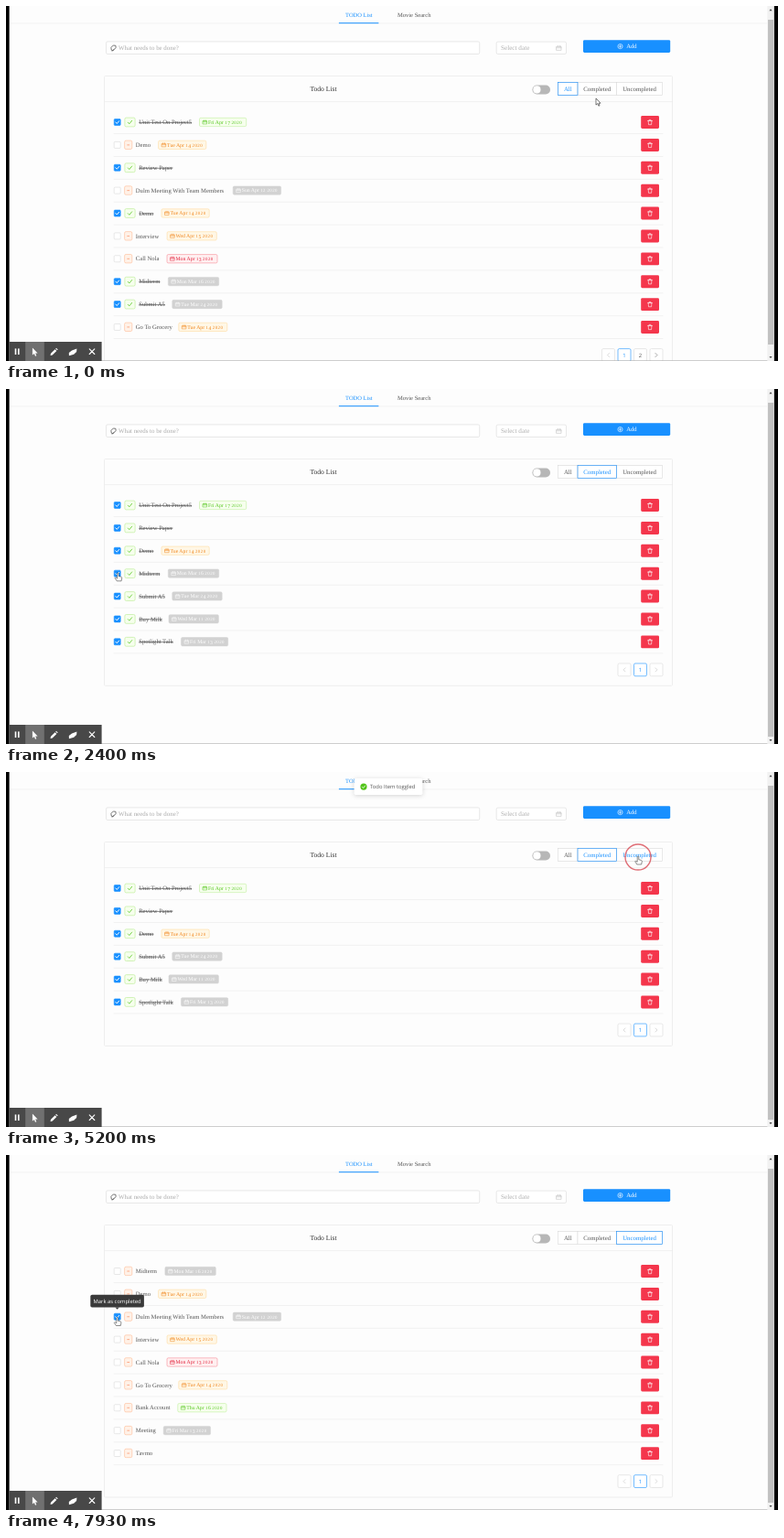
Recreate the animation shown at these times as an HTML page. Size 844 px wide and 388 px high, loop 8000 ms.

```html
<!DOCTYPE html>
<html lang="en">
<head>
<meta charset="utf-8">
<title>Todo list</title>
<style>
html, body { margin: 0; width: 100%; height: 100%; overflow: hidden; background: #fdfdfd; }
svg { display: block; width: 100vw; height: 100vh; }
text { font-family: "Liberation Serif", "Times New Roman", serif; font-size: 6.65px; fill: #555; text-rendering: geometricPrecision; }
.sans { font-family: "Open Sans", "Noto Sans", sans-serif; font-size: 5.87px; }
.mid { text-anchor: middle; }
.done { text-decoration: line-through; }
.date { font-size: 5.75px; }
.low { baseline-shift: -0.17em; }
.small { font-size: 0.84em; letter-spacing: 0.1em; }
.line { fill: none; stroke-linecap: round; stroke-linejoin: round; }
#toast rect { filter: drop-shadow(0 1.5px 2.5px rgba(0,0,0,.16)); }
</style>
</head>
<body>
<svg id="stage" viewBox="0 0 844 388" preserveAspectRatio="none"></svg>
<script>
const LOOP = 8000, BLUE = '#1890ff', RULE = '#ececec', ROW0 = 127, PITCH = 24.88;

// Time marks, ms
const T = { filterDone: 900, uncheck: 3120, refresh: 4400, filterOpen: 5790, check: 7830 };

const tones = {
  green: ['#f6ffed', '#b7eb8f', '#52c41a'],
  orange: ['#fff7e6', '#ffd591', '#f0861c'],
  red: ['#fff0f1', '#f47885', '#e2203a'],
  grey: ['#d2d2d2', '#d2d2d2', '#fff']
};

// name: [label, tag offset, tag width, date, tone]
const todos = {
  unit: ['Unit Test On Project5', 66.3, 51.2, 'Fri Apr 17 2020', 'green'],
  demo: ['Demo', 24.8, 52.2, 'Tue Apr 14 2020', 'orange'],
  paper: ['Review Paper'],
  team: ['Dulm Meeting With Team Members', 106.4, 52.4, 'Sun Apr 12 2020', 'grey'],
  talk: ['Interview', 34.3, 54.2, 'Wed Apr 15 2020', 'orange'],
  call: ['Call Nola', 34.2, 55, 'Mon Apr 13 2020', 'red'],
  midterm: ['Midterm', 32.1, 55.4, 'Mon Mar 16 2020', 'grey'],
  submit: ['Submit A5', 36.6, 54.4, 'Tue Mar 24 2020', 'grey'],
  grocery: ['Go To Grocery', 47, 53, 'Tue Apr 14 2020', 'orange'],
  milk: ['Buy Milk', 32.8, 54.4, 'Wed Mar 11 2020', 'grey'],
  spot: ['Spotlight Talk', 46.3, 51.2, 'Fri Mar 13 2020', 'grey'],
  bank: ['Bank Account', 46, 53.2, 'Thu Apr 16 2020', 'green'],
  meeting: ['Meeting', 30.4, 51.4, 'Fri Mar 13 2020', 'grey'],
  course: ['Tavmo']
};

// A leading + marks a finished todo
const views = {
  all: '+unit demo +paper team +demo talk call +midterm +submit grocery',
  done: '+unit +paper +demo +midterm +submit +milk +spot',
  doneLess: '+unit +paper +demo +submit +milk +spot',
  open: 'midterm demo team talk call grocery bank meeting course'
};

const rowY = i => ROW0 + PITCH * i;

const rect = (x, y, w, h, fill, stroke = 'none', r = 0, sw = 0.6) =>
  `<rect x="${x}" y="${y}" width="${w}" height="${h}" rx="${r}" fill="${fill}" stroke="${stroke}" stroke-width="${sw}"/>`;
const path = (d, stroke, sw = 0.7, extra = '') =>
  `<path class="line" d="${d}" stroke="${stroke}" stroke-width="${sw}" ${extra}/>`;
const text = (x, y, s, { cls = '', fill = '', size = 0, id = '' } = {}) =>
  `<text x="${x}" y="${y}" class="${cls}" ${id && `id="${id}"`} style="${fill && `fill:${fill};`}${size ? `font-size:${size}px` : ''}">${s}</text>`;
const group = (id, body) => `<g id="${id}">${body}</g>`;

// Old-style figures: 0-2 at x-height, 3 4 5 7 9 below the baseline
const figures = s => s.replace(/[0-2]+|[34579]+/g, d =>
  `<tspan class="${d < '3' ? 'small' : 'low'}">${d}</tspan>`);

const calendar = (x, y, s, color) =>
  path(`M${x} ${y - s * 0.35}h${s}v${s * 0.82}h${-s}zM${x} ${y - s * 0.05}h${s}M${x + s * 0.28} ${y - s * 0.52}v${s * 0.26}M${x + s * 0.72} ${y - s * 0.52}v${s * 0.26}`, color, 0.5);

function checkbox(y, on, border = '#d9d9d9') {
  return rect(118.2, y - 3.5, 7, 7, on ? BLUE : '#fff', on ? BLUE : border, 0.9) +
    (on ? path(`M119.9 ${y}l1.4 1.5 2.3-2.8`, '#fff', 0.95) : '');
}

function dateTag(x, y, w, date, tone) {
  const [fill, border, ink] = tones[tone];
  return rect(x, y - 4.7, w, 9.3, fill, border, 1.4, 0.5) +
    calendar(x + 3.9, y, 4.2, ink) +
    text(x + 9.5, y + 1.8, figures(date), { cls: 'date', fill: ink });
}

function row(key, i) {
  const done = key[0] === '+', y = rowY(i), x = done ? 145.2 : 141.8;
  const [label, dx, w, date, tone] = todos[key.replace('+', '')];
  const mark = done
    ? rect(129.9, y - 4.9, 11.2, 9.8, '#f6ffed', '#b7eb8f', 1.5) + path(`M133.3 ${y + 0.2}l1.5 1.6 2.9-3.5`, '#52c41a', 0.75)
    : rect(129.6, y - 4.8, 8.2, 9.4, '#fff2e8', '#ffbb96', 1.5) + path(`M132.7 ${y}h2`, '#fa7a48', 0.6);
  const bin = path(`M701.6 ${y - 1.5}h4.9M703 ${y - 1.5}v-1.1h2v1.1M702.2 ${y - 1.5}l.3 4.2h3.1l.3-4.2`, '#fff', 0.6);
  return checkbox(y, done) + mark +
    text(x, y + 2.1, label, { cls: done ? 'done' : '' }) +
    (date ? dateTag(x + dx, y, w, date, tone) : '') +
    rect(694.2, y - 6.9, 19.8, 13.9, '#f4364c', 'none', 1.4) + bin +
    path(`M118 ${y + 12.6}H718`, RULE);
}

function pager(y, pages) {
  const step = 17.5, first = 711 - step * (pages + 1);
  const box = (x, stroke) => rect(x - 7, y - 6.9, 14, 13.8, '#fff', stroke, 1.4);
  const arrow = (x, dir, on) => box(x, '#d9d9d9') +
    path(`M${x - dir} ${y - 2}l${2 * dir} 2l${-2 * dir} 2`, on ? '#666' : '#c4c4c4', 0.6);
  let out = arrow(first, -1, false) + arrow(711, 1, pages > 1);
  for (let p = 1; p <= pages; p++) {
    const x = first + step * p, color = p === 1 ? BLUE : '';
    out += box(x, color || '#d9d9d9') + text(x, y + 2.2, p, { cls: 'mid sans', fill: color });
  }
  return out;
}

function view(id) {
  const keys = views[id].split(' '), last = rowY(keys.length - 1);
  return group(id, rect(107.5, 76.5, 621, last + 48 - 76.5, 'none', RULE, 1, 0.9) +
    keys.map(row).join('') + pager(last + 30.6, id === 'all' ? 2 : 1));
}

function tooltip(id, w, y, label) {
  return group(id, rect(121.6 - w / 2, y - 24, w, 13.8, '#3a3a3a', 'none', 1.8) +
    `<path d="M119.4 ${y - 10.3}h4.4l-2.2 2.3z" fill="#3a3a3a"/>` +
    text(121.6, y - 15, label, { cls: 'mid sans', fill: '#fff' }));
}

const filters = [['all', 'All', 603.5, 21.5], ['done', 'Completed', 625, 42.5], ['open', 'Uncompleted', 667.5, 50]];

function header() {
  return path('M3.5 19H832', RULE) + path('M364.3 18.7H407', BLUE, 1, 'stroke-linecap="butt"') +
    text(385.8, 12, 'TODO List', { cls: 'mid', fill: BLUE, size: 6.45 }) +
    text(446.2, 12, 'Movie Search', { cls: 'mid', size: 6.55 }) +
    rect(109.5, 38.9, 408.2, 13.6, '#fff', '#d9d9d9', 1.6) +
    path('M115.2 47.8l-.3-2.4 2.4-2.4 2.6.3.3 2.3-3.2 2.8zM116 49l2-1.2', '#555', 0.8) +
    text(123, 48, 'What needs to be done?', { fill: '#aaa', size: 6.9 }) +
    rect(536.2, 39.1, 76.3, 13.4, '#fff', '#d9d9d9', 1.6) +
    text(541, 48, 'Select date', { fill: '#b0b0b0', size: 7.2 }) + calendar(602, 46, 5, '#b5b5b5') +
    rect(631, 37.2, 95.2, 13.8, BLUE, 'none', 1.4) +
    `<circle cx="671.5" cy="44.1" r="2.6" fill="none" stroke="#fff" stroke-width=".6"/>` +
    path('M670.1 44.1h2.8M671.5 42.7v2.8', '#fff', 0.6) +
    text(678.2, 46.4, 'Add', { fill: '#fff' });
}

function cardTop() {
  return path('M107.7 104.6H728.5', RULE) +
    text(347, 92.9, 'Todo List', { cls: 'mid', fill: '#333', size: 7.6 }) +
    rect(575.4, 86.5, 19.6, 9.9, '#b7b7b7', 'none', 5) + '<circle cx="580.4" cy="91.4" r="4.1" fill="#fff"/>' +
    filters.map(([id, label, x, w]) => rect(x, 83.5, w, 14, '#fff', '#d9d9d9') +
      text(x + w / 2, 92.8, label, { cls: 'mid', size: 6.8, id: 'label-' + id })).join('') +
    `<rect id="active" y="83.5" height="14" fill="none" stroke="${BLUE}" stroke-width=".6"/>`;
}

function frameEdges() {
  return rect(3.5, 387.4, 836, 0.6, '#b0b0b0') + rect(0, 0, 3.6, 388, '#000') + rect(839.6, 0, 4.4, 388, '#000') +
    rect(832.3, 0, 7.3, 388, '#f1f1f1') + '<rect id="thumb" x="833" y="15" width="6" fill="#c1c1c1"/>' +
    '<path d="M834.4 5.2h3.2l-1.6-2zM834.4 383h3.2l-1.6 2z" fill="#444"/>';
}

function toolbar() {
  return rect(3.6, 367, 101, 21, '#484848') + rect(21.2, 367, 20.6, 21, '#707070') +
    rect(9.7, 374.4, 1.6, 6.6, '#fff') + rect(13, 374.4, 1.6, 6.6, '#fff') +
    '<path d="M28.9 373.6v8l1.9-1.6 1.2 2.8 1.3-.6-1.2-2.7h2.5z" fill="#fff"/>' +
    '<path d="M48.5 382l.5-2.2 4.6-4.6 1.7 1.7-4.6 4.6zM54.2 374.6l.8-.8 1.7 1.7-.8.8z" fill="#fff"/>' +
    '<path d="M68.8 379l3.2-2.6 5.4-2-.3 3.6-3 2.8-5.2 1.5z" fill="#fff"/>' +
    path('M91.2 374.9l5.6 5.6M96.8 374.9l-5.6 5.6', '#fff', 1.1);
}

document.getElementById('stage').innerHTML =
  rect(0, 0, 844, 388, '#fdfdfd') + header() + Object.keys(views).map(view).join('') + cardTop() +
  group('unchecked', checkbox(rowY(3), false, BLUE)) +
  group('hovered', checkbox(rowY(2), false, BLUE)) +
  group('checked', checkbox(rowY(2), true)) +
  tooltip('tipDone', 65.4, rowY(3), 'Mark as uncompleted') +
  tooltip('tipOpen', 58.6, rowY(2), 'Mark as completed') +
  group('toast', rect(380.6, 7, 74.8, 18, '#fff', 'none', 1.8) +
    '<circle cx="391" cy="16.1" r="3.6" fill="#52c41a"/>' + path('M389.4 16.2l1.2 1.3 2-2.5', '#fff', 0.8) +
    text(398, 18.3, 'Todo Item toggled', { cls: 'sans' })) +
  frameEdges() + toolbar() +
  '<circle id="ring" r="14" fill="none" stroke="#d4343f" stroke-width="1.4"/>' +
  '<path id="arrow" d="M0 0V7.2L1.7 5.7 2.9 8.3 4 7.8 2.9 5.3H5Z" fill="#fff" stroke="#222" stroke-width=".6"/>' +
  '<path id="hand" d="M-.8 .8a.8 .8 0 0 1 1.6 0V3.8l2.6.6q1 .3 .9 1.4l-.6 3.2H-1.2L-3.3 5.8q.4-1 1.4-.3l1.1.8Z" fill="#fff" stroke="#333" stroke-width=".55"/>';

const $ = id => document.getElementById(id);
const show = (id, on) => $(id).setAttribute('visibility', on ? 'visible' : 'hidden');
const clamp = v => Math.max(0, Math.min(1, v));
// Fades in from a and is gone at b
const fade = (t, a, b, d) => Math.min(clamp((t - a) / d), clamp((b - t) / d));

const ease = {
  in: u => u * u,
  out: u => 1 - (1 - u) * (1 - u),
  both: u => u * u * (3 - 2 * u)
};

// [time, x, y, easing towards this point]
const track = [
  [0, 645, 101], [250, 645, 92, 'out'], [880, 645, 92, 'both'],
  [1600, 365, 155, 'in'], [2450, 121.6, 201, 'out'], [3440, 121.6, 201, 'both'],
  [4260, 667.5, 99.5, 'both'], [4650, 691, 92, 'both'], [6100, 691, 92, 'both'],
  [7130, 119.6, 177, 'both'], [7330, 121.6, 177.5, 'both'], [LOOP, 121.6, 177.5, 'both']
];

function pointer(t) {
  const i = track.findIndex(k => k[0] > t);
  const [t0, x0, y0] = track[i - 1], [t1, x1, y1, e] = track[i];
  const u = ease[e]((t - t0) / (t1 - t0));
  return [x0 + (x1 - x0) * u, y0 + (y1 - y0) * u];
}

const clicks = [[240, 480], [2960, 3260], [5190, 5480], [7590, 7840]];

function render(t) {
  const current = t < T.filterDone ? 'all' : t < T.refresh ? 'done' : t < T.filterOpen ? 'doneLess' : 'open';
  Object.keys(views).forEach(id => show(id, id === current));
  $('thumb').setAttribute('height', current === 'all' ? 355 : 365);

  const [x, y] = pointer(t);
  const overBar = y > 83.6 && y < 97.4;
  let hand = x < 126;
  for (const [id, , bx, w] of filters) {
    const over = overBar && x > bx && x < bx + w, active = current.startsWith(id);
    hand = hand || over;
    $('label-' + id).style.fill = over || active ? BLUE : '#555';
    if (active) {
      $('active').setAttribute('x', bx);
      $('active').setAttribute('width', w);
    }
  }

  show('unchecked', t >= T.uncheck && t < T.refresh);
  show('hovered', current === 'open' && x < 126 && t < T.check);
  show('checked', t >= T.check);
  $('tipDone').setAttribute('opacity', fade(t, 2480, 4420, 100));
  $('tipOpen').setAttribute('opacity', fade(t, 7200, LOOP + 200, 100));

  const toast = fade(t, T.refresh, 6950, 200);
  $('toast').setAttribute('opacity', toast);
  $('toast').setAttribute('transform', `translate(0 ${-10 * (1 - ease.out(toast))})`);

  const place = `translate(${x} ${y})`;
  for (const id of ['arrow', 'hand']) {
    show(id, (id === 'hand') === hand);
    $(id).setAttribute('transform', place);
  }
  const click = clicks.find(([a, b]) => t >= a && t < b);
  show('ring', !!click);
  if (click) {
    $('ring').setAttribute('transform', `translate(${x} ${y + 1})`);
    $('ring').setAttribute('opacity', fade(t, click[0] - 60, click[1], 100));
  }
}

const start = performance.now();
function tick() {
  render((performance.now() - start) % LOOP);
  requestAnimationFrame(tick);
}
tick();
</script>
</body>
</html>
```
